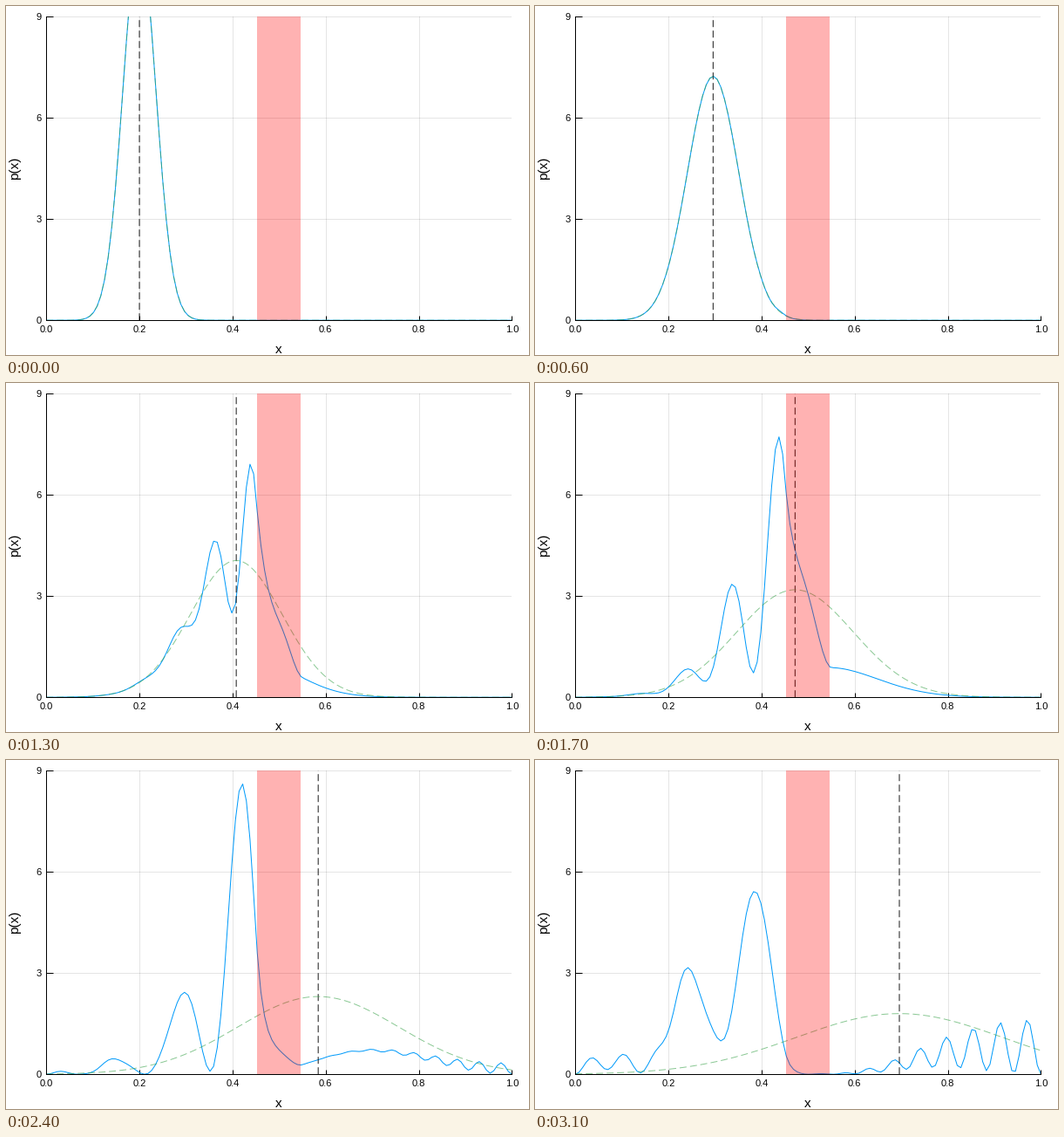
Animation, 600 px wide and 400 px high, one loop 3.15 s. Source, as a matplotlib script:

```python
import numpy as np
import matplotlib.pyplot as plt
from matplotlib.animation import FuncAnimation

W, H, DPI = 600, 400, 100
PX = 72 / DPI
FRAMES, INTERVAL = 63, 50

# Wave packet in a box with hard walls at 0 and 1 (hbar = m = 1)
N = 128
X0, K0, WIDTH = 0.2, 32.0, 0.05
V0, DT = 800.0, 2.5e-4
LO, HI = 58 / N, 70 / N

x = np.arange(N + 1) / N
xi = x[1:-1]
m = np.arange(1, N)
sines = np.sqrt(2 / N) * np.sin(np.pi * np.outer(m, m) / N)
kinetic = (sines * (np.pi * m) ** 2 / 2) @ sines
barrier = np.diag(np.where((xi >= LO) & (xi <= HI), V0, 0.0))
energy, modes = np.linalg.eigh(kinetic + barrier)
psi0 = (np.pi * WIDTH**2) ** -0.25 * np.exp(
    -((xi - X0) ** 2) / (2 * WIDTH**2) + 1j * K0 * xi
)
coef = modes.T @ psi0


def density(t):
    psi = modes @ (coef * np.exp(-1j * energy * t))
    return np.pad(np.abs(psi) ** 2, 1)


def free_density(t):
    var = WIDTH**2 / 2 * (1 + (t / WIDTH**2) ** 2)
    return np.exp(-((x - X0 - K0 * t) ** 2) / (2 * var)) / np.sqrt(2 * np.pi * var)


plt.rcParams["font.family"] = "Liberation Sans"
fig = plt.figure(figsize=(W / DPI, H / DPI), dpi=DPI, facecolor="white")

LEFT, RIGHT, TOP, BOTTOM = 46.2, 580.4, 11.8, 360.2
ax = fig.add_axes(
    [LEFT / W, 1 - BOTTOM / H, (RIGHT - LEFT) / W, (BOTTOM - TOP) / H]
)
ax.set(xlim=(0, 1), ylim=(0, 9))
ax.set_xticks(np.linspace(0, 1, 6))
ax.set_yticks([0, 3, 6, 9])
ax.set_axisbelow(True)
ax.grid(color="black", alpha=0.1, lw=PX)
ax.tick_params(direction="in", width=PX, labelbottom=False, labelleft=False)
ax.tick_params(axis="x", length=5 * PX)
ax.tick_params(axis="y", length=8 * PX)
ax.spines[["top", "right"]].set_visible(False)
ax.spines[["left", "bottom"]].set_linewidth(PX)


def label(px, py, text, size, ha="center", rotation=0):
    fig.text(px / W, 1 - py / H, text, fontsize=size, ha=ha, va="baseline",
             rotation=rotation, rotation_mode="anchor")


for v in ax.get_xticks():
    label(LEFT + v * (RIGHT - LEFT), 374, f"{v:.1f}", 8)
for v in (0, 3, 6, 9):
    label(41, BOTTOM - v / 9 * (BOTTOM - TOP) + 4, str(v), 8, ha="right")
label(313, 398, "x", 11)
label(14, 186, "p(x)", 11, rotation=90)

DASH = (0, (8, 4))
wave, = ax.plot([], [], color="#009AFA", lw=PX, zorder=2.0)
centre, = ax.plot([], [], color="black", lw=PX, ls=DASH, alpha=0.9,
                  dash_capstyle="butt", snap=False, zorder=2.1)
free, = ax.plot([], [], color="#3DA44D", lw=PX, ls=DASH, alpha=0.6,
                dash_capstyle="butt", zorder=2.2)
ax.axvspan(LO, HI, color="red", alpha=0.3, lw=0, zorder=2.3)


def update(n):
    t = n * DT
    wave.set_data(x, density(t))
    free.set_data(x, free_density(t))
    mid = X0 + K0 * t
    centre.set_data([mid, mid], [0, 9])
    return wave, free, centre


anim = FuncAnimation(fig, update, frames=FRAMES, interval=INTERVAL,
                     repeat=True, repeat_delay=0, blit=False)
plt.show()
```
